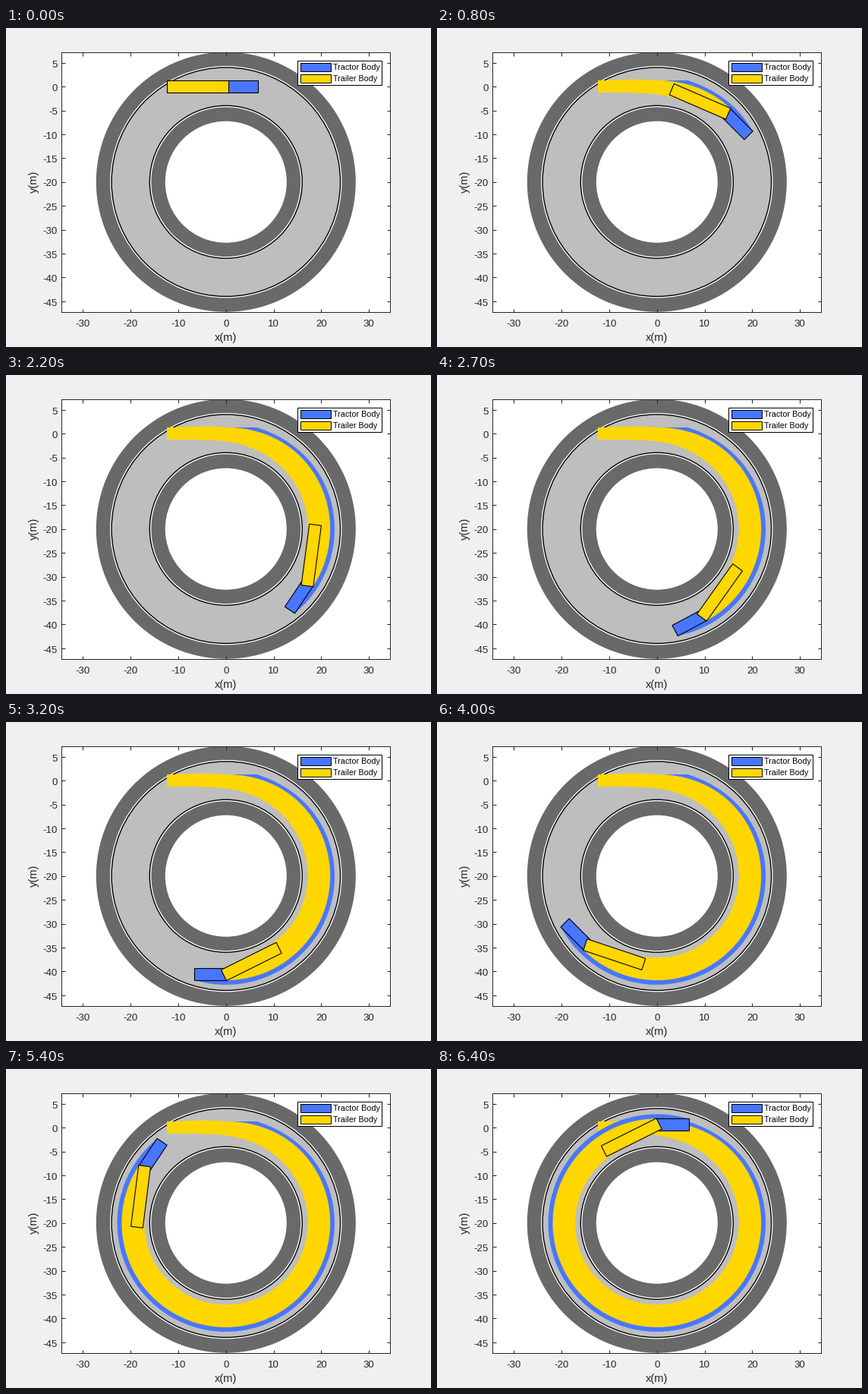
A matplotlib script that plays this animation: 560 px wide and 420 px high, repeating every 6500 ms.

```python
import numpy as np
import matplotlib.pyplot as plt
from matplotlib.animation import FuncAnimation
from matplotlib.collections import PolyCollection
from matplotlib.patches import Annulus, Circle, Polygon, Rectangle

W, H, DPI = 560, 420, 100
FRAMES, STEP_MS = 65, 100
SUB = 5                      # trail footprints per frame
SCALE = 6.28                 # pixels per metre
CENTER = np.array([0, -20])
BLUE, GOLD = "#4876ff", "#ffd700"
DARK, ROAD, INK = "#696969", "#bebebe", "#262626"

HALF_WIDTH = 1.26
TRACTOR = (0.0, 6.7)         # rear and front, measured from the hitch
TRAILER = (-12.42, 0.5)
TRAILER_BASE = 9.2           # hitch to trailer axle
TURN = 2 * np.pi / 64        # angle driven per frame


def pt(px):
    return px * 72 / DPI


plt.rcParams["font.family"] = "Liberation Sans"
fig = plt.figure(figsize=(W / DPI, H / DPI), dpi=DPI, facecolor="#f0f0f0")

left, right, top, bottom = 73.3, 506.3, 31.7, 373.7
mid_x, mid_y = (left + right) / 2, (top + bottom) / 2
ax = fig.add_axes([left / W, 1 - bottom / H, (right - left) / W, (bottom - top) / H])
half_x, half_y = (right - left) / 2 / SCALE, (bottom - top) / 2 / SCALE
ax.set_xlim(-half_x, half_x)
ax.set_ylim(CENTER[1] - half_y, CENTER[1] + half_y)
x_ticks, y_ticks = range(-30, 31, 10), range(-45, 6, 5)
ax.set_xticks(x_ticks)
ax.set_yticks(y_ticks)
ax.tick_params(direction="in", length=pt(4.5), width=pt(1), color=INK, top=True,
               right=True, labelbottom=False, labelleft=False)
for spine in ax.spines.values():
    spine.set(linewidth=pt(1), color=INK)


def label(x, y, text, size, color=INK, **kw):
    fig.text(x / W, 1 - y / H, text, fontsize=pt(size), color=color, **kw)


for v in x_ticks:
    label(mid_x + v * SCALE, 393, str(v), 13.3, ha="center", va="baseline")
for v in y_ticks:
    label(68, mid_y - (v + 20) * SCALE + 5.8, str(v), 13.3, ha="right", va="baseline")
label(mid_x, 412, "x(m)", 14.67, ha="center", va="baseline")
label(36.5, 202, "y(m)", 14.67, ha="center", va="center", rotation=90)

# road
for outer, inner, color in ((27.23, 24.32, DARK), (24, 16, ROAD), (15.67, 12.74, DARK)):
    ax.add_patch(Annulus(CENTER, outer, outer - inner, fc=color, ec="none", zorder=1))
for radius in (24, 16):
    ax.add_patch(Circle(CENTER, radius, fill=False, ec="black", lw=pt(1.4), zorder=2))


def box(hitch, heading, span):
    """Corners of a body that lies along heading, with the hitch as origin."""
    ahead = np.array([np.cos(heading), np.sin(heading)])
    side = HALF_WIDTH * np.array([-ahead[1], ahead[0]])
    rear, front = (hitch + d * ahead for d in span)
    return np.array([rear + side, front + side, front - side, rear - side])


def path_radius(n):
    return 20.6 - 0.6 * np.exp(-(n / 6) ** 2)


def drive(fine=10):
    """Tractor and trailer outlines at every trail step, trailer towed by the hitch."""
    outlines = []
    towed = 0.0
    dt = 1 / (SUB * fine)
    for k in range((FRAMES - 1) * SUB * fine + 1):
        n = k * dt
        angle, radius = n * TURN, path_radius(n)
        if k % fine == 0:
            hitch = CENTER + radius * np.array([np.sin(angle), np.cos(angle)])
            outlines += [box(hitch, -angle, TRACTOR), box(hitch, towed, TRAILER)]
        towed += radius * TURN * dt * np.sin(-angle - towed) / TRAILER_BASE
    return outlines


outlines = drive()
trail = PolyCollection([], facecolors=[BLUE, GOLD], edgecolors="none", zorder=3)
ax.add_collection(trail, autolim=False)


def body(color, z):
    shape = Polygon(np.zeros((4, 2)), fc=color, ec="black", lw=pt(1.1),
                    joinstyle="miter", zorder=z)
    return ax.add_patch(shape)


tractor, trailer = body(BLUE, 4), body(GOLD, 5)


def legend_box(x, y, w, h, color):
    fig.add_artist(Rectangle((x, H - 1 - y - h), w, h, fc=color, ec="black", lw=pt(1),
                             transform=None, zorder=6))


legend_box(384, 42, 111, 32, "white")
for y, color, name in ((45, BLUE, "Tractor Body"), (60, GOLD, "Trailer Body")):
    legend_box(388, y, 40, 11, color)
    label(431, y + 10, name, 10.8, "black", va="baseline", zorder=7)


def draw(i):
    shown = outlines[:2 * (i * SUB + 1)]
    trail.set_verts(shown)
    tractor.set_xy(shown[-2])
    trailer.set_xy(shown[-1])
    return trail, tractor, trailer


anim = FuncAnimation(fig, draw, frames=FRAMES, init_func=lambda: draw(0),
                     interval=STEP_MS, repeat=True, repeat_delay=0)
plt.show()
```
